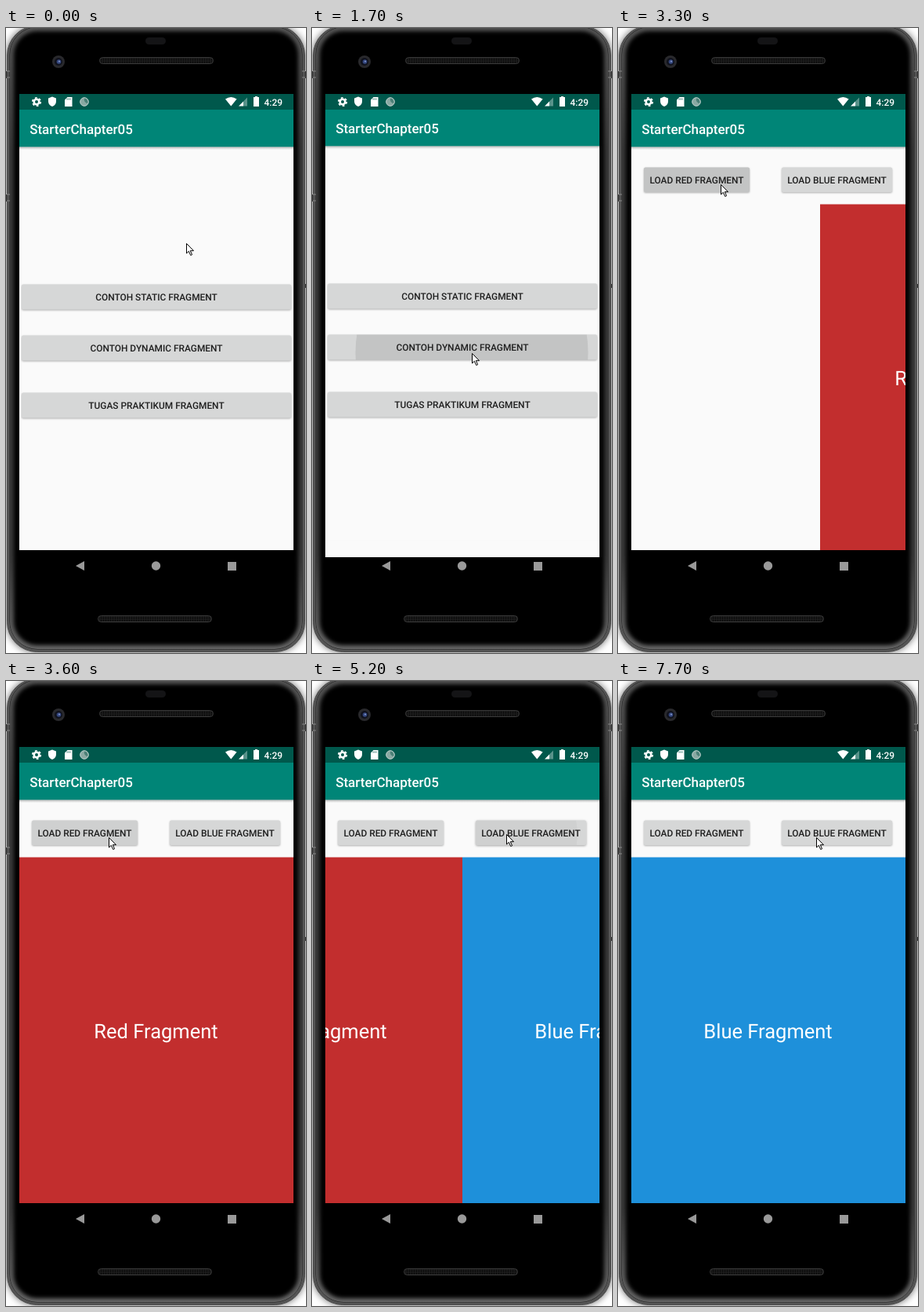
These frames come from a looping animation (383 by 796 pixels, 8 s). An HTML page:

```html
<!DOCTYPE html>
<html lang="en">
<head>
<meta charset="utf-8">
<title>Fragment demo</title>
<style>
  html, body { margin: 0; width: 100%; height: 100%; overflow: hidden; background: #fff; }
  svg { display: block; width: 100%; height: 100%; }
  text { font-family: Roboto, sans-serif; text-rendering: geometricPrecision; }
  .medium { font-weight: 500; }
  .mid { text-anchor: middle; }
</style>
</head>
<body>
<svg viewBox="0 0 383 796">
  <defs>
    <clipPath id="screenClip"><rect x="17" y="84" width="350" height="591"/></clipPath>
    <clipPath id="paneClip"><rect x="17" y="224.5" width="350" height="440.5"/></clipPath>
    <clipPath id="wipeClip"><rect id="wipe" x="17" y="84" width="350" height="591"/></clipPath>
    <clipPath id="bodyClip"><rect x="5" y="-1" width="373" height="792" rx="35"/></clipPath>
    <linearGradient id="bar" x2="0" y2="1">
      <stop stop-opacity=".28"/><stop offset="1" stop-opacity="0"/>
    </linearGradient>
    <linearGradient id="rim" x2="0" y2="1">
      <stop stop-color="#555"/><stop offset=".2" stop-color="#383838"/>
      <stop offset=".85" stop-color="#383838"/><stop offset="1" stop-color="#666"/>
    </linearGradient>
    <pattern id="mesh" width="3" height="3" patternUnits="userSpaceOnUse">
      <rect width="3" height="3" fill="#1c1c1c"/><circle cx="1.5" cy="1.5" r=".9" fill="#060606"/>
    </pattern>
  </defs>

  <!-- phone body -->
  <rect width="383" height="796" fill="#fff"/>
  <path d="M0 55h4v9h-4zM0 212h4v9h-4zM379 55h4v9h-4zM380 326h3v5h-3z" fill="#444"/>
  <rect x="1.5" y="-3" width="380" height="797.5" rx="38" fill="#555" stroke="#4a4a4a" style="filter:drop-shadow(0 0 5px #0009)"/>
  <rect x="5" y="-1" width="373" height="792" rx="35" stroke="#222"/>
  <g clip-path="url(#bodyClip)">
    <rect x="5" y="-1" width="373" height="792" rx="35" fill="none" stroke="url(#rim)" stroke-width="10" style="filter:blur(2.5px)"/>
  </g>
  <path d="M1 55h4m-4 8h4M1 212h4m-4 8h4M378 55h4m-4 8h4" stroke="#888"/>
  <rect x="178" y="12" width="26" height="9" rx="4.5" fill="#141416"/>
  <g fill="url(#mesh)" stroke="#383838">
    <rect x="119.5" y="37.5" width="145" height="8" rx="4"/>
    <rect x="117.5" y="748.5" width="145" height="8" rx="4"/>
  </g>
  <circle cx="67" cy="43" r="8" fill="#29292c"/>
  <circle cx="67" cy="43" r="5" fill="#10121d"/>
  <circle cx="67.5" cy="43" r="2.8" fill="#34477f"/>
  <circle cx="68" cy="42.5" r="1.1" fill="#8193c8"/>

  <!-- navigation bar -->
  <rect x="17" y="665" width="350" height="41"/>
  <g fill="#999">
    <path d="M89 685 100 679v12zM283 680h11v11h-11z"/>
    <circle cx="191.5" cy="685" r="5.7"/>
  </g>

  <g clip-path="url(#screenClip)">
    <rect x="17" y="84" width="350" height="581" fill="#fafafa"/>
    <g id="home"></g>
    <g clip-path="url(#wipeClip)"><g id="detail"></g></g>

    <!-- status icons stay above both screens -->
    <rect x="17" y="84" width="350" height="20" fill="#00584c"/>
    <circle cx="39" cy="94" r="3.3" fill="none" stroke="#fff" stroke-width="2.6"/>
    <circle cx="39" cy="94" r="5.2" fill="none" stroke="#fff" stroke-width="1.8" stroke-dasharray="2.72"/>
    <g fill="#fff">
      <path d="M59 87.5 64 89.5v4c0 3-2 5.5-5 6.500-3-1-5-3.500-5-6.500v-4z"/>
      <path d="M78.500 88h6v12h-9.500v-8.500z"/>
      <path d="M280 90.500q7.300-5 14.600 0L287.300 99.500z"/>
      <path d="M297 99.500 303 93.500v6zM318 88v-1h3v1h2v12h-7v-12z"/>
      <path d="M303 93.500 308 88.500v11h-5z" opacity=".35"/>
      <text class="medium" x="329.500" y="98.500" font-size="11.9">4:29</text>
    </g>
    <path d="M78 89.500v2m2-2v2m2-2v2" stroke="#00584c" stroke-width=".8"/>
    <circle cx="100" cy="94" r="5.3" fill="#8aa9a3" stroke="#c3d3d0"/>
    <path d="M100 89.500a4.500 4.500 0 0 1 4 6.500a5 5 0 0 1-4-6.500" fill="#4c8077"/>
  </g>

  <path id="cursor" d="M.5.5v12.500l2.800-2.700 2.400 5.200 1.900-.8-2.300-5h4.200z" fill="#fff" stroke="#000"/>
</svg>

<script>
const $ = id => document.getElementById(id);
const LOOP = 8000, STEP = 100;
const TOP_BAR = `
  <rect x="17" y="84" width="350" height="591" fill="#fafafa"/>
  <rect x="17" y="665" width="350" height="10"/>
  <rect x="17" y="151" width="350" height="4" fill="url(#bar)"/>
  <rect x="17" y="84" width="350" height="67.3" fill="#008577"/>
  <text class="medium" x="30.2" y="134.6" font-size="17" fill="#fff">StarterChapter05</text>`;

const button = (id, x, y, w, h, label) => `
  <clipPath id="${id}Clip"><rect x="${x}" y="${y}" width="${w}" height="${h}" rx="2"/></clipPath>
  <rect id="${id}" x="${x}" y="${y}" width="${w}" height="${h}" rx="2" fill="#d6d7d7"/>
  <g clip-path="url(#${id}Clip)"><circle id="${id}Ripple"/></g>
  <text class="medium mid" x="${x + w / 2}" y="${y + h / 2 + 4.3}" font-size="11.9" fill="#1f1f1f">${label}</text>`;

const pane = (id, color, label) => `
  <g id="${id}">
    <rect x="17" y="224" width="350" height="441" fill="${color}"/>
    <text class="mid" x="191.5" y="455" font-size="25.5" fill="#fff">${label}</text>
  </g>`;

$('home').innerHTML = TOP_BAR +
  button('staticBtn', 20, 326.5, 344, 32, 'CONTOH STATIC FRAGMENT') +
  button('dynamicBtn', 20, 391.5, 344, 32, 'CONTOH DYNAMIC FRAGMENT') +
  button('taskBtn', 20, 464.5, 344, 32, 'TUGAS PRAKTIKUM FRAGMENT');
$('detail').innerHTML = TOP_BAR +
  button('redBtn', 33, 177.5, 135, 31.5, 'LOAD RED FRAGMENT') +
  button('blueBtn', 209, 177.5, 141, 31.5, 'LOAD BLUE FRAGMENT') +
  '<g clip-path="url(#paneClip)">' +
  pane('red', '#c22e2e', 'Red Fragment') +
  pane('blue', '#1e90da', 'Blue Fragment') + '</g>';

// Pointer stops: time, x, y
const PATH = [
  [0, 230, 274], [700, 204, 417], [900, 204, 417], [1100, 204, 414],
  [1800, 204, 414], [2100, 195, 370], [2300, 160, 270], [2400, 146, 230],
  [2600, 146, 230], [2800, 131, 199], [3900, 131, 199], [4500, 248, 195],
  [6900, 248, 195], [7100, 247, 227], [7200, 247, 227], [7700, 253, 199], [8000, 253, 199]
];

const clamp = v => Math.max(0, Math.min(1, v));
const span = (t, start, length) => clamp((t - start) / length);
const smooth = p => (1 - Math.cos(Math.PI * p)) / 2;
// Everything moves by whole pixels
const shift = (id, x, y) => $(id).setAttribute('transform', `translate(${Math.floor(x)} ${Math.floor(y)})`);

function pointer(t) {
  const i = PATH.findIndex(p => p[0] > t);
  const [t0, x0, y0] = PATH[i - 1], [t1, x1, y1] = PATH[i];
  const p = smooth((t - t0) / (t1 - t0));
  return [x0 + (x1 - x0) * p, y0 + (y1 - y0) * p];
}

function press(id, t, start, end, x, y) {
  const on = t >= start && t < end;
  const p = span(t, start - 40, 260);
  const fade = 1 - span(t, end - 300, 300);
  const ripple = $(id + 'Ripple');
  ripple.setAttribute('cx', x);
  ripple.setAttribute('cy', y);
  ripple.setAttribute('r', 10 + 150 * p);
  ripple.setAttribute('opacity', on ? 0.09 * Math.min(1, p * 2) * fade : 0);
  // The button rises only for the first moment of a press
  const lift = on ? 1 - span(t, start, 200) : 0;
  $(id).style.filter = `drop-shadow(0 1px ${1 + lift}px rgba(0,0,0,${0.3 + 0.1 * lift}))`;
}

function draw(t) {
  shift('cursor', ...pointer(t));

  press('staticBtn', t, LOOP, LOOP, 0, 0);
  press('taskBtn', t, LOOP, LOOP, 0, 0);
  press('dynamicBtn', t, 1500, 2100, 204, 414);
  press('redBtn', t, 3100, 3700, 131, 199);
  press('blueBtn', t, 5100, 5300, 248, 195);

  // The second screen is revealed upwards while it settles
  const open = smooth(span(t, 1650, 400));
  shift('home', 0, -8 * open);
  shift('detail', 0, 10 * (1 - open));
  $('wipe').setAttribute('y', 84 + 591 * (1 - open));
  $('detail').style.display = open ? '' : 'none';

  const red = smooth(span(t, 3150, 400));
  const blue = smooth(span(t, 5100, 200));
  shift('red', 350 * (1 - red - blue), 0);
  shift('blue', 350 * (1 - blue), 0);
}

const begin = performance.now();
function tick() {
  const t = (performance.now() - begin) % LOOP;
  draw(Math.floor(t / STEP) * STEP);
  requestAnimationFrame(tick);
}
tick();
</script>
</body>
</html>
```
